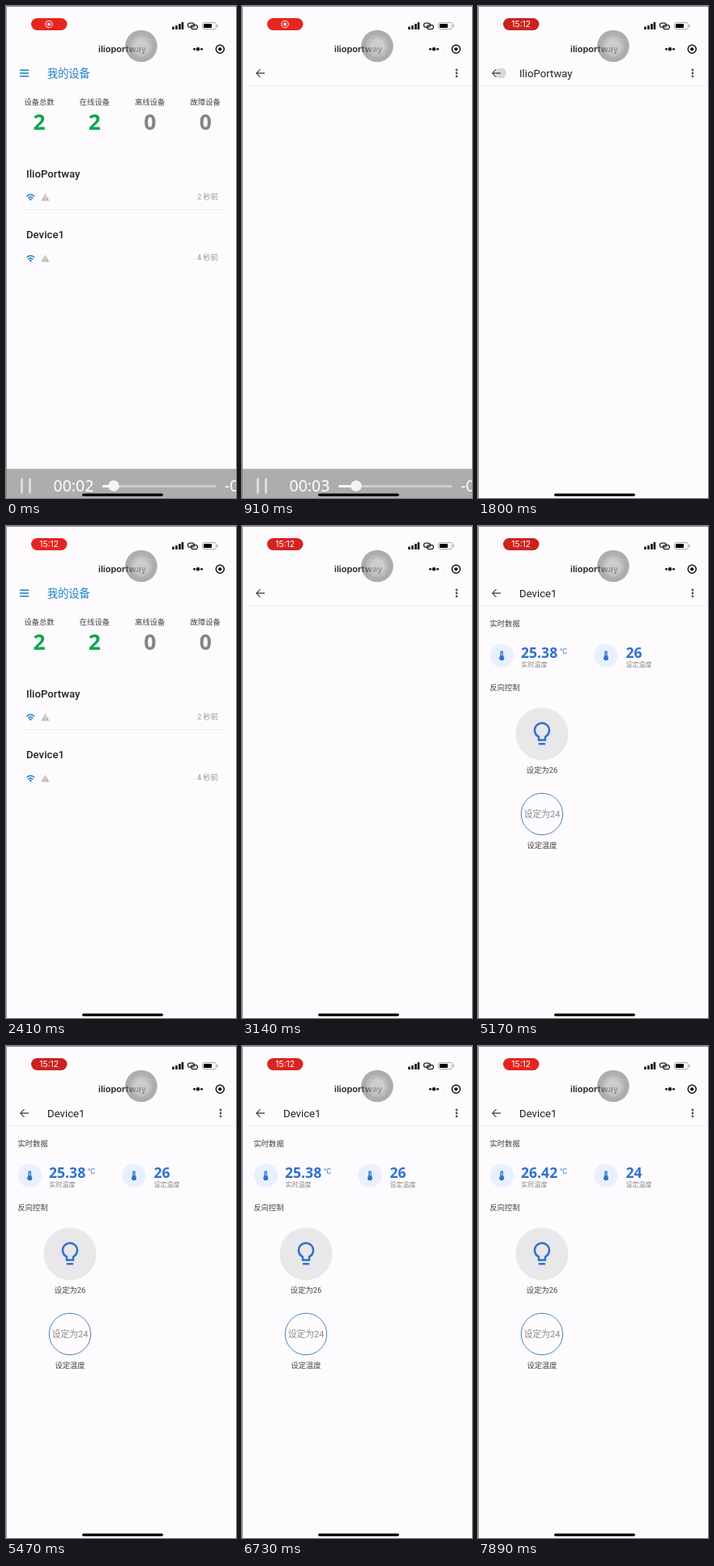
Recreate the animation shown at these times as an HTML page. Size 284 by 608 pixels, loop 8000 ms.

```html
<!DOCTYPE html>
<html lang="zh">
<head>
<meta charset="utf-8">
<style>
html, body { margin: 0; width: 100%; height: 100%; overflow: hidden; background: #fdfbfd; }
svg { display: block; width: 284px; height: 608px; }
text { font-family: Roboto, "Noto Sans CJK SC", "Noto Sans CJK", sans-serif; fill: #222; }
.mid { text-anchor: middle; }
.num { font-family: "Open Sans", sans-serif; font-weight: 700; }
.label { font-size: 9.3px; fill: #444; }
.name { font-size: 13.2px; font-weight: 500; }
.head { font-size: 13.2px; }
.ago { font-size: 9.3px; fill: #999; text-anchor: end; }
.hint { font-size: 8px; fill: #888; }
.blue { fill: #2f71d0; }
.line { fill: none; stroke-linecap: round; stroke-linejoin: round; }
</style>
</head>
<body>
<svg viewBox="0 0 284 608">
  <defs>
    <g id="wifi" class="line" stroke="#1c80c8" stroke-width="1.4">
      <path d="M-4.5-1.5Q0-5.3 4.5-1.5M-2.6.7Q0-1.5 2.6.7"/>
      <circle cy="2.6" r=".7" fill="#1c80c8"/>
    </g>
    <g id="warn">
      <path d="M0-4.5L5 4.2H-5Z" fill="#bbb"/>
      <path d="M0-1.5V1.2M0 2.2V3.2" stroke="#fff"/>
    </g>
    <g id="thermo">
      <circle r="14.7" fill="#e9f0fd"/>
      <path d="M0-4V3" class="line" stroke="#2f71d0" stroke-width="3.6"/>
      <circle cy="3.2" r="3" class="blue"/>
      <path d="M.2-4V0" stroke="#e9f0fd" stroke-width=".9"/>
    </g>
  </defs>
  <rect width="284" height="608" fill="#fdfbfd"/>

  <g id="list">
    <path d="M17 79.3H28M17 83H28M17 86.7H28" stroke="#1c80c8" stroke-width="1.4"/>
    <text x="51" y="88" font-size="13.2" style="fill:#1c80c8">我的设备</text>
    <g id="stats"></g>
    <g id="cards"></g>
    <path d="M19 251.5H268" stroke="#ebe9eb"/>
  </g>

  <g id="detail">
    <path d="M4 98.5H284" stroke="#efedef"/>
    <circle id="tap" cx="28.5" cy="83" fill="#000" opacity=".14"/>
    <path d="M27.5 83H18M22.3 78.4L17.7 83L22.3 87.6" class="line" stroke="#555" stroke-width="1.3"/>
    <g fill="#555"><circle cx="265" cy="79" r="1.4"/><circle cx="265" cy="83" r="1.4"/><circle cx="265" cy="87" r="1.4"/></g>
    <text id="title" class="head" x="51" y="87.6"></text>
    <g id="panel">
      <text class="label" x="14.5" y="123.5">实时数据</text>
      <use href="#thermo" x="29.3" y="160"/>
      <text id="temp" class="num blue" x="53" y="162.5" font-size="17.6"></text>
      <text class="blue" x="101" y="158" font-size="9">°C</text>
      <text class="hint" x="53.5" y="174">实时温度</text>
      <use href="#thermo" x="158" y="160"/>
      <text id="goal" class="num blue" x="182.5" y="162.5" font-size="17.6"></text>
      <text class="hint" x="182.5" y="174">设定温度</text>
      <text class="label" x="14.5" y="202.5">反向控制</text>
      <circle cx="79" cy="257" r="32.5" fill="#e9e7e9"/>
      <g class="line" stroke="#2f71d0" stroke-width="2.5">
        <path d="M75 264.5V260.5A9 9 0 1 1 83 260.5V264.5Z" stroke-linejoin="miter"/>
        <path d="M76 269.2H82" stroke-width="2.4"/>
      </g>
      <text class="label mid" x="79" y="305">设定为26</text>
      <circle id="button" cx="79" cy="356" r="25.7" stroke="#4a86c5" fill="#000" fill-opacity="0"/>
      <text class="mid" x="79" y="360" font-size="10.8" style="fill:#8c8a8c">设定为24</text>
      <text class="label mid" x="79" y="398">设定温度</text>
    </g>
  </g>

  <g id="status">
    <rect id="pill" x="31" y="15" width="44.5" height="15" rx="7.5"/>
    <g id="rec"><circle cx="53" cy="22.5" r="4.3" fill="none" stroke="#fff"/><circle cx="53" cy="22.5" r="2" fill="#fff"/></g>
    <text id="clock" class="mid" x="53.2" y="26.2" font-size="10.3" style="fill:#fff;font-family:Inter,sans-serif">15:12</text>
    <path d="M206.5 29V25.5M210.5 29V24M214.5 29V22M218 29V20" stroke="#111" stroke-width="2.6"/>
    <g class="line" stroke="#222" stroke-width="1.2">
      <rect x="224.5" y="21.2" width="8" height="5" rx="2.5"/>
      <rect x="228.5" y="23.6" width="8" height="5" rx="2.5"/>
    </g>
    <rect x="242.5" y="20.5" width="17" height="8" rx="2.2" fill="none" stroke="#aaa"/>
    <rect x="244" y="22" width="10" height="5" rx="1"/>
    <path d="M261.3 23V26" stroke="#aaa" stroke-width="1.2"/>
    <text class="mid" x="143.8" y="57" font-size="11" font-weight="600" style="font-family:Inter,sans-serif">ilioportway</text>
    <circle cx="232.5" cy="53.3" r="1.4"/><circle cx="237" cy="53.3" r="2.2"/><circle cx="241.6" cy="53.3" r="1.4"/>
    <path d="M250.5 47V60" stroke="#f3f1f3"/>
    <circle cx="264.3" cy="53.3" r="5" fill="none" stroke="#111" stroke-width="1.5"/>
    <circle cx="264.3" cy="53.3" r="2.1"/>
    <circle cx="167" cy="49.5" r="19.8" fill="#717071" opacity=".56"/>
    <g fill="#fff"><circle cx="167" cy="49.5" r="14" opacity=".14"/><circle cx="167" cy="49.5" r="11.5" opacity=".14"/><circle cx="167" cy="49.5" r="9" opacity=".18"/></g>
  </g>

  <g id="player">
    <rect y="572" width="284" height="36" fill="#aeacad"/>
    <path d="M19.5 583.5V602.5M29.5 583.5V602.5" stroke="#e4e2e3" stroke-width="2.6"/>
    <text id="time" x="58.5" y="600" font-size="19.5" style="fill:#fff;font-family:'Noto Sans',sans-serif"></text>
    <path d="M120.5 593.5H258.5" class="line" stroke="#cfcdce" stroke-width="3"/>
    <path id="played" class="line" stroke="#fff" stroke-width="3"/>
    <circle id="knob" cy="593" r="6.8" fill="#f5f4f5"/>
    <text x="270" y="600" font-size="19.5" style="fill:#fff;font-family:'Noto Sans',sans-serif">-00:27</text>
  </g>

  <rect x="94" y="602.4" width="100" height="3.4" rx="1.7" fill="#000"/>
  <path d="M.5 608V.5H284" fill="none" stroke="#8b898b"/>
</svg>
<script>
const $ = id => document.getElementById(id);
const show = (id, on) => $(id).style.display = on ? '' : 'none';
const set = (id, attrs) => { for (const k in attrs) $(id).setAttribute(k, attrs[k]); };
const clamp = v => Math.max(0, Math.min(1, v));

$('stats').innerHTML = ['设备总数', '在线设备', '离线设备', '故障设备'].map((label, i) => {
  const x = 41 + i * 68.4, good = i < 2;
  return `<text class="label mid" x="${x}" y="121.5">${label}</text>
    <text class="num mid" x="${x}" y="153.3" font-size="26.5" style="fill:${good ? '#0ca84f' : '#858385'}">${good ? 2 : 0}</text>`;
}).join('');

$('cards').innerHTML = [['IlioPortway', 2], ['Device1', 4]].map(([name, ago], i) =>
  `<g transform="translate(0 ${i * 75.5})">
    <text class="name" x="25" y="211.5">${name}</text>
    <use href="#wifi" x="30.3" y="236.5"/><use href="#warn" x="48.5" y="236.5"/>
    <text class="ago" x="262" y="238.5">${ago} 秒前</text>
  </g>`).join('');

function draw(t) {
  const onList = t < 600 || (t >= 2150 && t < 2860);
  show('list', onList);
  show('detail', !onList);
  $('title').textContent = t < 2150 ? (t >= 1040 ? 'IlioPortway' : '') : t >= 3280 ? 'Device1' : '';
  show('panel', t >= 3420);

  const press = clamp((t - 1650) / 350);
  set('tap', { r: t < 2150 ? 15 * press : 0, cx: 28.5 - 6 * clamp((t - 1800) / 200) });
  const held = clamp((t - 5520) / 100) * clamp((5860 - t) / 150);
  set('button', { 'fill-opacity': 0.08 * held });

  const updated = t >= 7600;
  $('temp').textContent = updated ? '26.42' : '25.38';
  $('goal').textContent = updated ? '24' : '26';

  // the recording badge pulses once it shows the clock
  const recording = t < 1400;
  const glow = recording ? 0.9 : (1 + Math.cos((t - 4450) / 1850 * 2 * Math.PI)) / 2;
  set('pill', { fill: `rgb(${202 + 30 * glow},${34 + 3 * glow},${30 + 2 * glow})` });
  show('rec', recording);
  show('clock', !recording);

  const late = t >= 450, x = late ? 141 : 133;
  show('player', t < 1490);
  $('time').textContent = late ? '00:03' : '00:02';
  set('played', { d: `M120.5 593.5H${x}` });
  set('knob', { cx: x });
}

function frame() {
  draw(performance.now() % 8000);
  requestAnimationFrame(frame);
}
frame();
</script>
</body>
</html>
```
